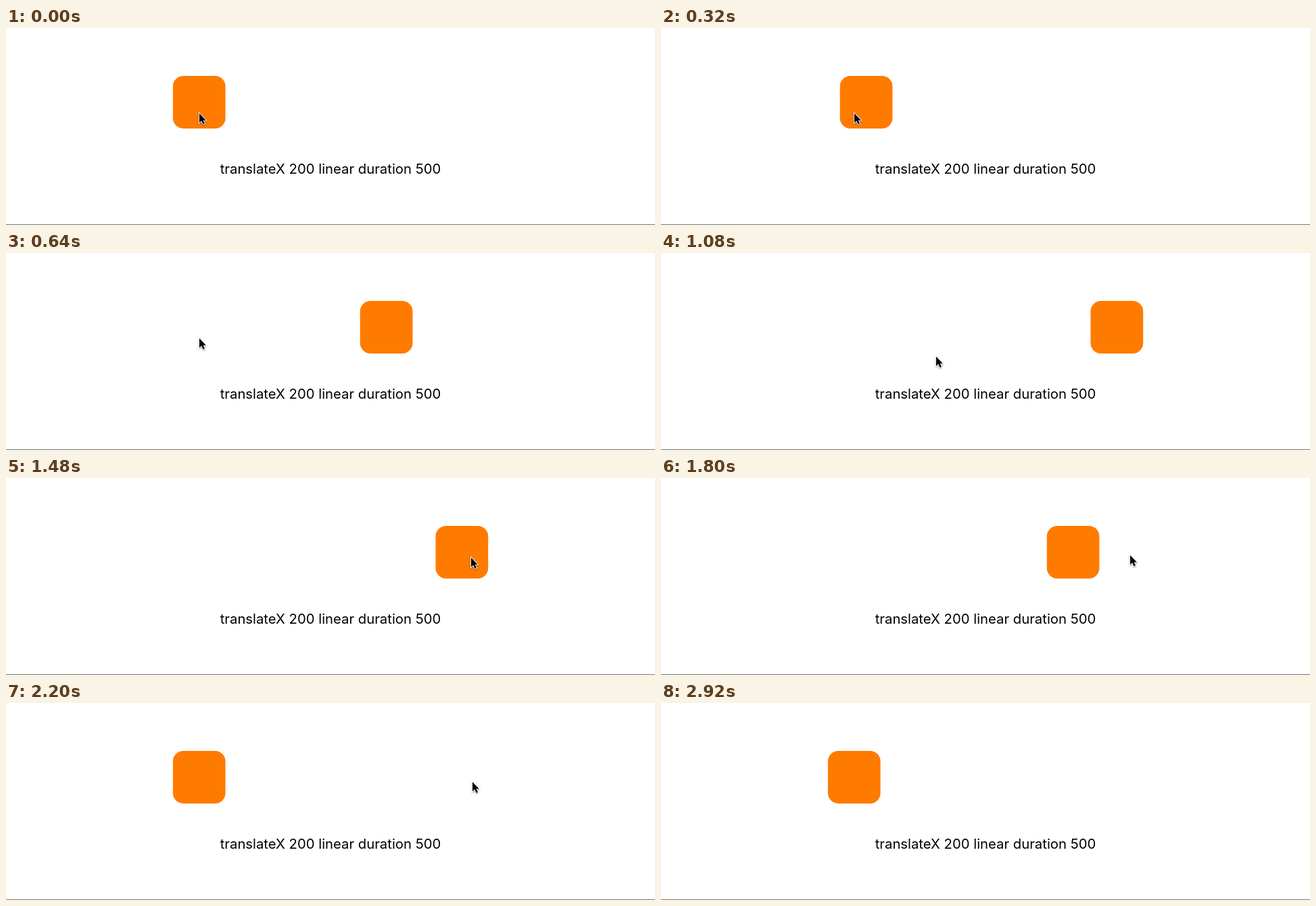
These frames come from a looping animation (960x292 px, 2.96 s). An HTML page:

```html
<!DOCTYPE html>
<html lang="en">
<head>
<meta charset="utf-8">
<title>translateX</title>
<style>
  html, body { margin: 0; width: 100%; height: 100%; overflow: hidden; background: #fff; }
  svg { display: block; }
  text { font: 20.3px Inter, Roboto, sans-serif; text-anchor: middle; }
  #pointer { stroke: #fff; stroke-width: 1.8; paint-order: stroke; filter: drop-shadow(0 1px 1px #0006); }
</style>
</head>
<body>
<svg width="960" height="292" viewBox="0 0 960 292">
  <rect id="box" y="71" width="77.7" height="78" rx="15.5" fill="#ff7b00"/>
  <text x="480" y="216">translateX 200 linear duration 500</text>
  <rect y="291" width="960" height="1" fill="#777"/>
  <path id="pointer" d="M0 0V14L3.2 11.1L5.6 16.2L8 15.2L5.7 10.2H9.8Z"/>
</svg>
<script>
const LOOP = 2960, STEP = 40;
const box = document.getElementById('box');
const pointer = document.getElementById('pointer');

// [time, x, y] of the pointer tip
const path = [
  [0, 286, 126.5], [840, 286, 126.5], [1080, 407, 153.5], [1240, 540, 146],
  [1480, 688, 118], [1600, 694, 114.5], [1800, 694, 114.5], [2200, 690, 117],
  [2400, 690, 117], [2600, 698, 14], [2640, 698, -25], [LOOP, 698, -25]
];

const clamp = v => Math.min(1, Math.max(0, v));
const smooth = v => v * v * (3 - 2 * v);

function pointerAt(t) {
  const i = path.findIndex(p => p[0] > t);
  const [t0, x0, y0] = path[i - 1], [t1, x1, y1] = path[i];
  const k = (t - t0) / (t1 - t0);
  const e = t0 === 840 ? smooth(k) : k;
  return [x0 + (x1 - x0) * e, y0 + (y1 - y0) * e];
}

function draw(now) {
  const t = Math.floor(now % LOOP / STEP) * STEP;
  const shift = clamp((t - 298) / 480) - clamp((t - 1720) / 480);
  box.setAttribute('x', 246.9 + 388.6 * shift);
  pointer.setAttribute('transform', `translate(${pointerAt(t)})`);
}

const start = performance.now();
function tick() {
  draw(performance.now() - start);
  requestAnimationFrame(tick);
}
tick();
</script>
</body>
</html>
```
